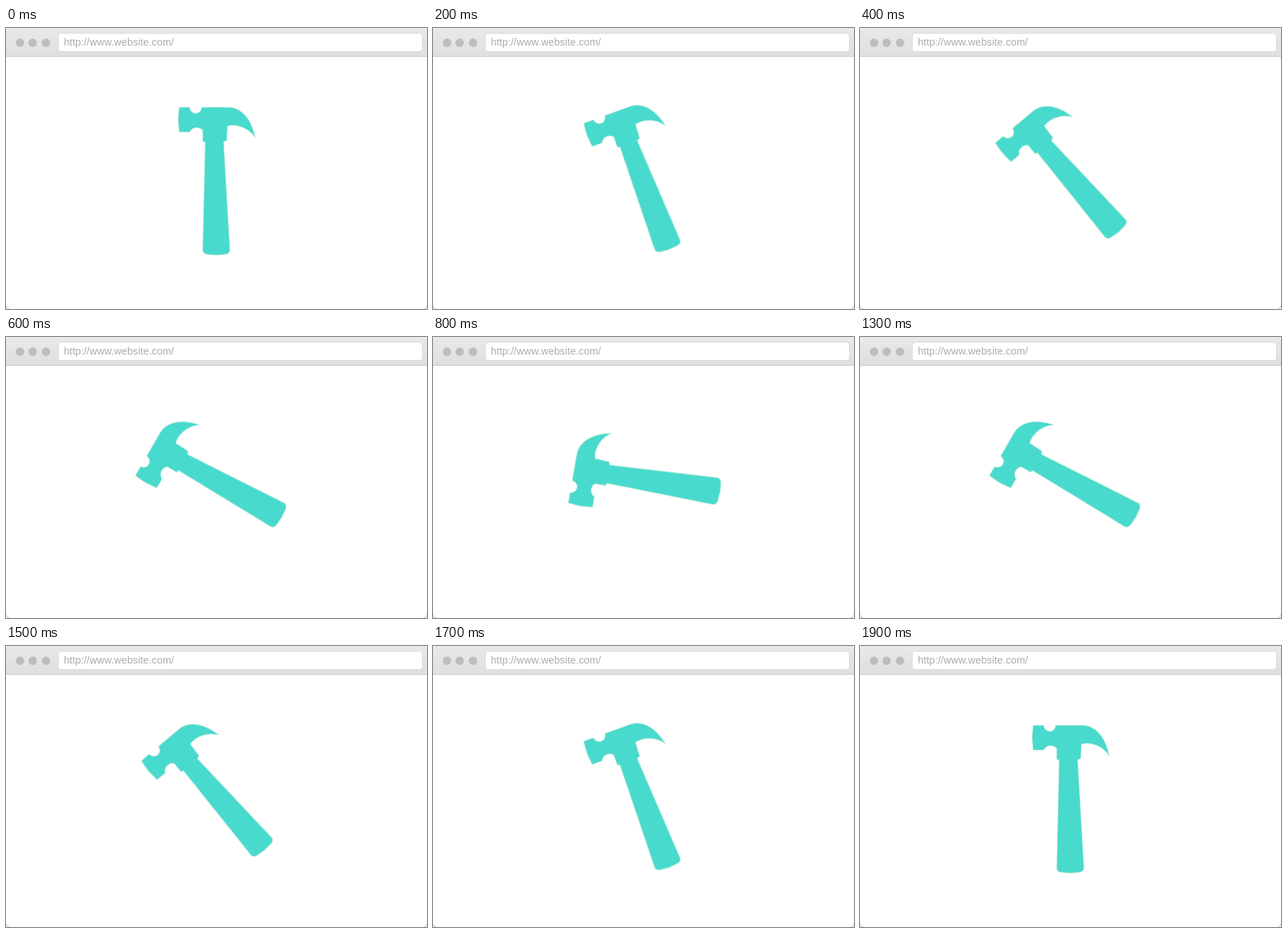
Recreate the animation shown at these times as an HTML page. Size 600x400 px, loop 2.1 s.

```html
<!DOCTYPE html>
<html lang="en">
<head>
<meta charset="utf-8">
<title>Hammer</title>
<style>
  html, body { margin: 0; width: 100%; height: 100%; overflow: hidden; background: #fff; }
  svg { display: block; width: 600px; height: 400px; }
  text { font: 14.5px "Liberation Sans", Arial, sans-serif; letter-spacing: .06px; fill: #acacac; }
  #hammer { transform-box: view-box; transform-origin: 0 0; }
</style>
</head>
<body>
<svg viewBox="0 0 600 400">
  <defs>
    <linearGradient id="bar" x2="0" y2="1">
      <stop stop-color="#e9e9e9"/>
      <stop offset="1" stop-color="#dfdfdf"/>
    </linearGradient>
  </defs>

  <path d="M0 40V4Q0 0 4 0H596Q600 0 600 4V40Z" fill="url(#bar)"/>
  <rect y="40" width="600" height="1" fill="#cbcbcb"/>
  <g fill="#bdbdbd">
    <circle cx="20" cy="21" r="6"/>
    <circle cx="38" cy="21" r="6"/>
    <circle cx="57" cy="21" r="6"/>
  </g>
  <rect x="74.5" y="7.5" width="519" height="26" rx="4" fill="#fff" stroke="#d8d8d8"/>
  <text x="82.5" y="25">http://www.website.com/</text>
  <path d="M0 395Q.5 399.5 5 400M600 395Q599.5 399.5 595 400" fill="none" stroke="#c4c4c4"/>

  <g id="hammer">
    <path transform="translate(-300 -218)" fill="#48dacd" stroke="#a5e2cf" stroke-width=".7" stroke-linejoin="round"
      d="M247 113H261.5C262 118 266 121.5 270.5 121.5S278.500 118 279 113H318
         C337 114 350 131 355 156C347 143 330 136 315.500 139.500L314.500 160L310 162
         L319 316Q319 320 314 321.800Q300 324.500 285 321.800Q280.500 320 280.500 316
         L284 162L280.500 161.500V146C277 140 265 140 262 148H247Q244 130 247 113Z"/>
  </g>
</svg>
<script>
  // Centre of the tool for each 10-degree step of the swing
  const xs = [300, 300.5, 300.7, 300.7, 301, 301.4, 302, 303.5, 305.5, 307.5];
  const ys = [218, 217.3, 216.2, 213, 209.8, 206.6, 203.8, 202.6, 202, 202];
  const loop = 2100, tick = 100, last = xs.length - 1;

  const pose = i => `translate(${xs[i]}px, ${ys[i]}px) rotate(${-10 * i}deg)`;
  const key = (time, i) => ({ offset: time / loop, transform: pose(i), easing: 'step-end' });

  const frames = [];
  for (let i = 0; i <= last; i++) frames.push(key(i * tick, i));
  for (let i = last - 1; i >= 0; i--) frames.push(key(1100 + (last - 1 - i) * tick, i));
  frames.push(key(loop, 0));

  document.getElementById('hammer').animate(frames, { duration: loop, iterations: Infinity });
</script>
</body>
</html>
```
